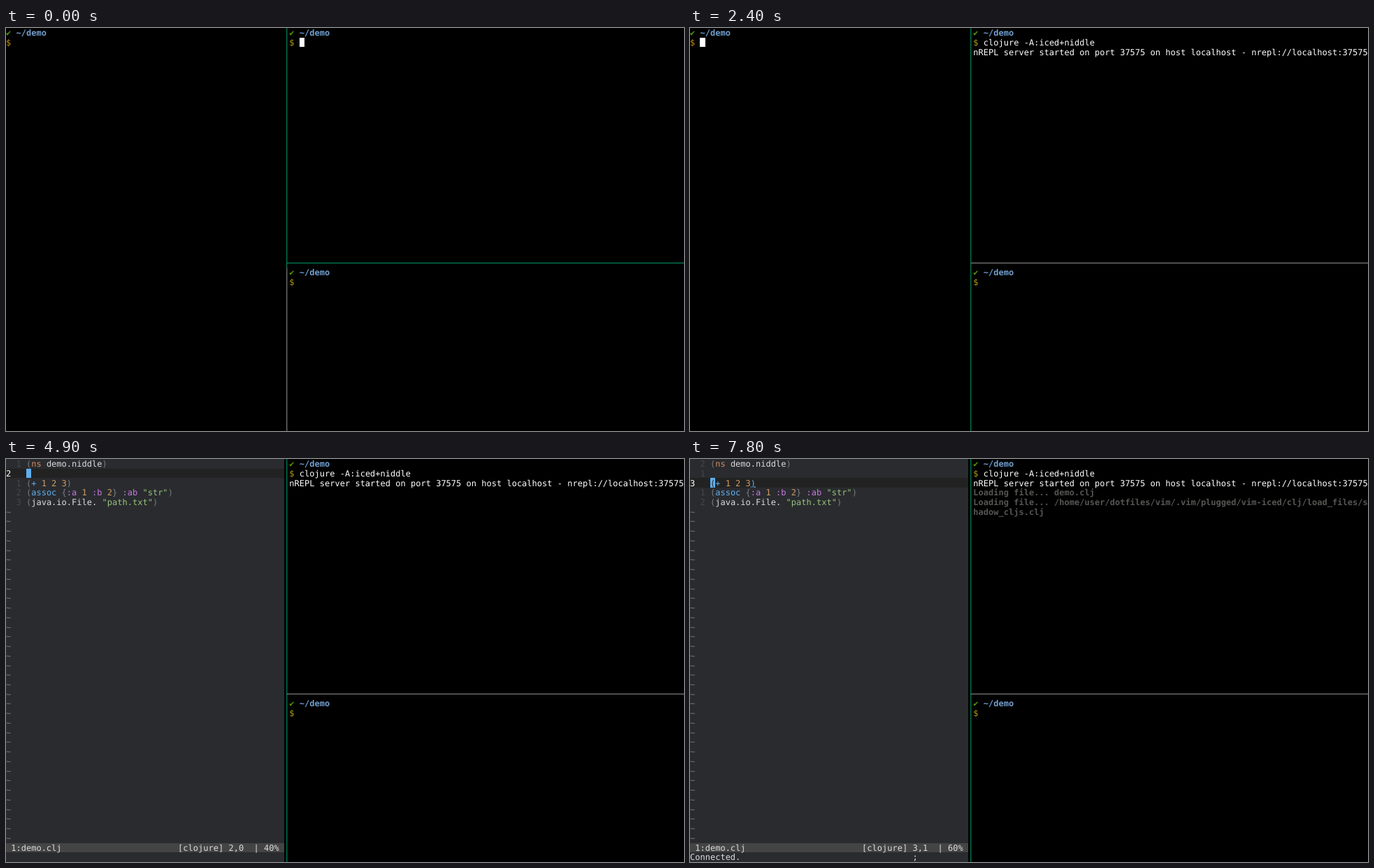
Animation, 970 px wide and 577 px high, one loop 8000 ms. Source, as an HTML page:

```html
<!DOCTYPE html>
<html lang="en">
<head>
<meta charset="utf-8">
<title>Terminal session</title>
<style>
  html, body { margin: 0; width: 100%; height: 100%; overflow: hidden; background: #000; }
  svg { display: block; }
  text {
    font-family: "DejaVu Sans Mono", monospace;
    font-size: 12.0235px;
    white-space: pre;
    text-rendering: geometricPrecision;
  }
  .cell { shape-rendering: crispEdges; }
  .fg { fill: #fff; }
  .ok { fill: #4e9a06; font-weight: bold; }
  .dir { fill: #729fcf; font-weight: bold; }
  .ps { fill: #b5a00c; }
  .ps-left { fill: #c4900f; }
  .log { fill: #555753; font-weight: bold; }
  .plain { fill: #dcdcdc; }
  .paren { fill: #7c7c7c; }
  .num { fill: #d19a66; }
  .ns { fill: #d58a5c; }
  .fn { fill: #61afef; }
  .key { fill: #c678dd; }
  .str { fill: #98c379; }
  .lnum { fill: #45474b; }
  .tilde { fill: #75777a; }
  .dark { fill: #26282c; }
  .match { fill: #61afef; text-decoration: underline; }
</style>
</head>
<body>
<svg id="stage" width="970" height="577" viewBox="0 0 970 577"></svg>
<script>
const LOOP = 8000;
const CW = 970 / 134, CH = 577 / 42, BASE = 11.03;
const RIGHT = 56, LOWER = 25, SPLIT = 55;
const GREEN = '#00875f', GREY = '#808080';
const stage = document.getElementById('stage');
const layers = [];

const rect = (x, y, w, h, fill, cls = '') =>
  `<rect x="${x}" y="${y}" width="${w}" height="${h}" fill="${fill}" class="${cls}"/>`;

// Filled block of character cells
function cells(col, row, cols, rows, fill) {
  const x = Math.round(col * CW), y = Math.round(row * CH);
  return rect(x, y, Math.round((col + cols) * CW) - x,
    Math.round((row + rows) * CH) - y, fill, 'cell');
}

// Consecutive [class, text] pieces on one row
function run(col, row, ...parts) {
  let out = '';
  for (const [cls, str] of parts) {
    const x = (col * CW).toFixed(2), y = (row * CH + BASE).toFixed(2);
    if (str.trim()) out += `<text x="${x}" y="${y}" class="${cls}">${str}</text>`;
    col += str.length;
  }
  return out;
}

const cursor = (col, row) => cells(col, row, 1, 1, '#fff');

const prompt = (col, row, ps) =>
  run(col, row, ['ok', '✔'], ['fg', ' '], ['dir', '~/demo']) +
  run(col, row + 1, [ps, '$']);

function show(from, to, markup) {
  const g = document.createElementNS('http://www.w3.org/2000/svg', 'g');
  g.innerHTML = markup;
  stage.append(g);
  layers.push({ g, from, to });
}

function borders(lower, across) {
  const x = SPLIT * CW + 3.05, mid = LOWER * CH;
  return rect(x, 0, 1.2, mid, GREEN) + rect(x, mid, 1.2, 577 - mid, lower) +
    rect(x + 0.8, 335.9, 970 - x, 1.2, across);
}

const CODE = [
  [['paren', '('], ['ns', 'ns'], ['plain', ' demo.niddle'], ['paren', ')']],
  [],
  [['paren', '('], ['fn', '+'], ['num', ' 1 2 3'], ['paren', ')']],
  [['paren', '('], ['fn', 'assoc'], ['paren', ' {'], ['key', ':a'], ['num', ' 1'],
   ['key', ' :b'], ['num', ' 2'], ['paren', '}'], ['key', ' :ab'], ['str', ' "str"'], ['paren', ')']],
  [['paren', '('], ['plain', 'java.io.File.'], ['str', ' "path.txt"'], ['paren', ')']]
];

// Editor pane with the cursor on the given line (1-based)
function editor(line, { message = '', pending = '', command = '' } = {}) {
  const at = line - 1;
  let out = cells(0, 0, SPLIT, 42, '#292b2f') + cells(0, at, SPLIT, 1, '#222');
  if (!command) out += cells(4, at, 1, 1, '#61afef');
  CODE.forEach((parts, row) => {
    const here = row === at;
    out += here ? run(0, row, ['fg', String(line)])
                : run(2, row, ['lnum', String(Math.abs(row - at))]);
    const last = parts.length - 1;
    out += run(4, row, ...parts.map(([cls, str], i) =>
      here && i === 0 ? ['dark', str] : here && i === last ? ['match', str] : [cls, str]));
  });
  for (let row = CODE.length; row < 40; row++) out += run(0, row, ['tilde', '~']);

  const pos = `${line},${CODE[at].length ? 1 : 0}`;
  out += cells(0, 40, SPLIT, 1, '#444') +
    run(1, 40, ['plain', '1:demo.clj']) +
    run(34, 40, ['plain', `[clojure] ${pos}  | ${line * 20}%`]);
  if (command) {
    out += cells(0, 41, 1, 1, '#e4e4e4') + run(0, 41, ['dark', ':'], ['plain', command]);
  }
  return out + run(0, 41, ['plain', message]) + run(44, 41, ['plain', pending]);
}

// Frame and prompts
show(0, 1800, borders(GREY, GREEN));
show(1800, LOOP, borders(GREEN, GREY));
show(0, LOOP, prompt(RIGHT, 0, 'ps') + prompt(RIGHT, LOWER, 'ps'));
show(0, 3400, prompt(0, 0, 'ps-left'));

// Upper right shell
show(0, 500, cursor(58, 1));
show(500, LOOP, run(58, 1, ['fg', 'clojure -A:iced+niddle']));
show(500, 1100, cursor(80, 1));
show(1100, 1800, cursor(RIGHT, 2));
show(2400, LOOP, run(RIGHT, 2,
  ['fg', 'nREPL server started on port 37575 on host localhost - nrepl://localhost:37575']));
show(6600, LOOP,
  run(RIGHT, 3, ['log', 'Loading file... demo.clj']) +
  run(RIGHT, 4, ['log', 'Loading file... /home/user/dotfiles/vim/.vim/plugged/vim-iced/clj/load_files/s']) +
  run(RIGHT, 5, ['log', 'hadow_cljs.clj']));

// Left shell
show(1800, 3000, cursor(2, 1));
show(3000, 3400, run(2, 1, ['fg', 'vim demo.clj']) + cursor(14, 1));
show(3400, 3700, cursor(0, 0));

// Editor
const message = 'Connected.', pending = ';';
show(3700, 4300, editor(1));
show(4300, 4900, editor(3));
show(4900, 5400, editor(2));
show(5400, 5600, editor(2, { pending }));
show(5600, 6600, editor(2, { command: 'IcedConnect' }));
show(6600, 7500, editor(2, { message }));
show(7500, 7800, editor(3, { message }));
show(7800, LOOP, editor(3, { message, pending }));

const start = performance.now();
function draw() {
  const t = (performance.now() - start) % LOOP;
  for (const { g, from, to } of layers) {
    g.style.display = t >= from && t < to ? '' : 'none';
  }
  requestAnimationFrame(draw);
}
draw();
</script>
</body>
</html>
```
